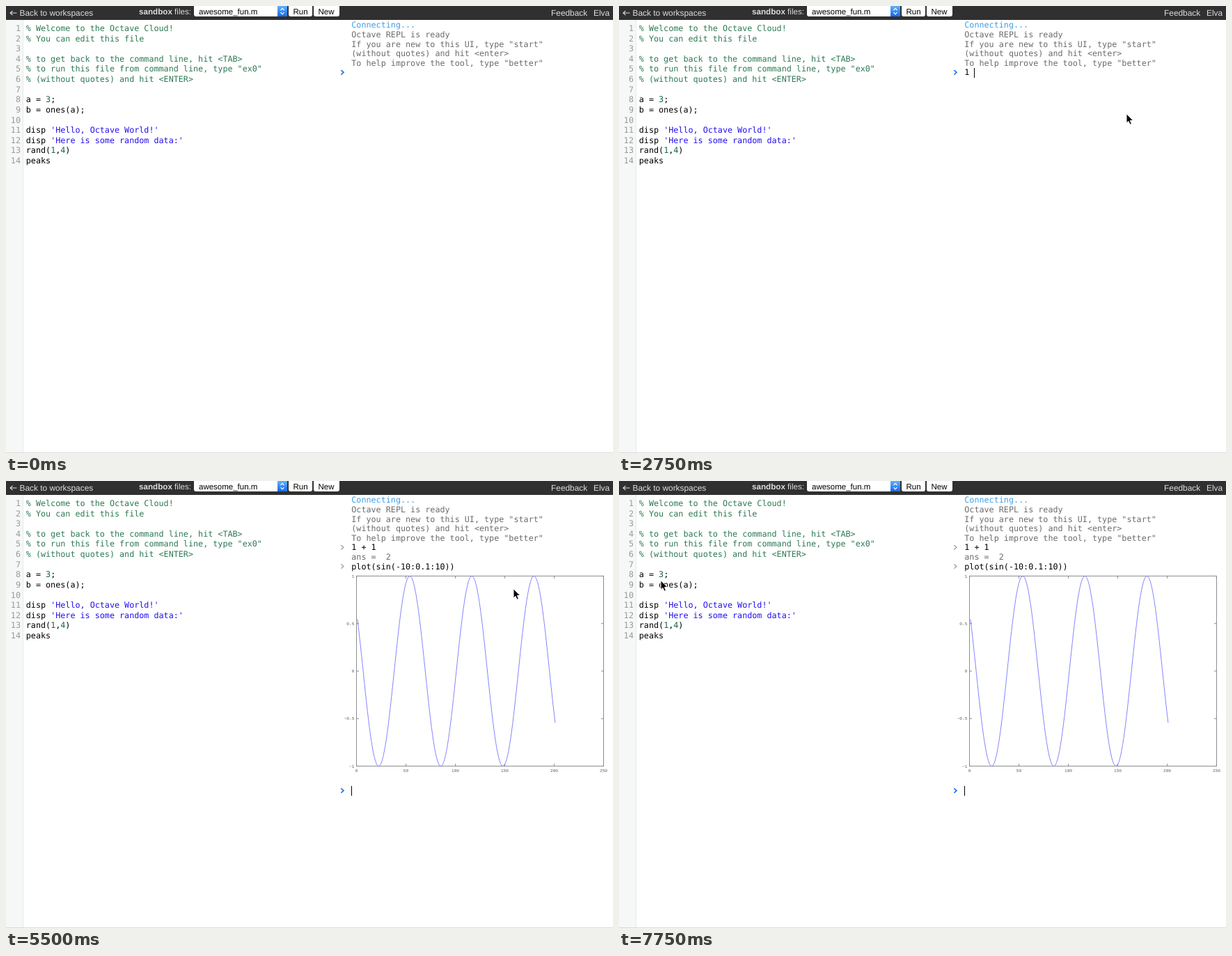
Recreate the animation shown at these times as an HTML page. Size 872 px wide and 642 px high, loop 8000 ms.

```html
<!DOCTYPE html>
<html lang="en">
<head>
<meta charset="utf-8">
<title>Octave workspace</title>
<style>
html, body { margin: 0; width: 100%; height: 100%; overflow: hidden; background: #fff; }
svg { display: block; width: 872px; height: 642px; }
text { white-space: pre; text-rendering: geometricPrecision; }
.mono { font: 11.74px "DejaVu Sans Mono", monospace; }
.ui { font: 11.9px "Liberation Sans", sans-serif; fill: #ddd; }
.ctl { font: 11.5px "Liberation Sans", sans-serif; fill: #000; }
.tick { font: 6.1px "Liberation Mono", monospace; fill: #606060; }
.num { fill: #999; text-anchor: end; }
.comment { fill: #2c7a52; }
.string { fill: #2410ee; }
.number { fill: #116644; }
.reply { fill: #6c6c6c; }
.status { fill: #3d9fe8; }
.prompt { fill: none; stroke: #a0a0a0; stroke-width: 1.3; }
.prompt.live { stroke: #2a78e4; stroke-width: 1.7; }
</style>
</head>
<body>
<svg id="stage" viewBox="0 0 872 642">
  <defs>
    <linearGradient id="blue" x2="0" y2="1">
      <stop stop-color="#62b0fa"/><stop offset="1" stop-color="#1769ea"/>
    </linearGradient>
  </defs>
  <rect width="872" height="642" fill="#fff"/>
  <rect y="20" width="24" height="622" fill="#f6f8f7"/>
  <path d="M24.5 20V642" stroke="#e2e4e3" stroke-width=".8"/>
  <rect y="641.5" width="872" height=".5" fill="#bbb"/>

  <rect width="872" height="20" fill="#303030"/>
  <path d="M15.5 10H6M9.5 6.8L6 10L9.5 13.2" fill="none" stroke="#ddd" stroke-width="1.1"/>
  <text class="ui" x="19.5" y="13.6">Back to workspaces</text>
  <text class="ui" x="191" y="12" style="font-size:11.65px"><tspan font-weight="bold">sandbox</tspan> files:</text>
  <text class="ui" x="783" y="13.6">Feedback</text>
  <text class="ui" x="844" y="13.6">Elva</text>

  <path d="M270 0H404V12a3 3 0 0 1-3 3H273a3 3 0 0 1-3-3Z" fill="#fff"/>
  <path d="M390 0H404V12a3 3 0 0 1-3 3H390Z" fill="url(#blue)"/>
  <path d="M394.5 6L397 3.3L399.5 6M394.5 9.2L397 11.9L399.5 9.2" fill="none" stroke="#fff" stroke-width="1.2"/>
  <path d="M406 0H440V12a3 3 0 0 1-3 3H409a3 3 0 0 1-3-3ZM442 0H479V12a3 3 0 0 1-3 3H445a3 3 0 0 1-3-3Z" fill="#fff"/>
  <text class="ctl" x="277" y="11.6">awesome_fun.m</text>
  <text class="ctl" x="423" y="11.6" text-anchor="middle">Run</text>
  <text class="ctl" x="460" y="11.6" text-anchor="middle">New</text>

  <g id="editor" class="mono"></g>
  <g id="repl" class="mono"></g>
  <g id="plot"></g>
  <path id="live" class="prompt live"/>
  <text id="input" class="mono" x="496.3"></text>
  <rect id="caret" width="1" height="14"/>
  <path id="mouse" d="M1 .8V14.2L4 11.5L6.1 16.3L8.4 15.3L6.4 10.6H10.8Z" stroke="#fff" stroke-width="1" stroke-linejoin="round"/>
</svg>
<script>
const NS = 'http://www.w3.org/2000/svg';
const $ = id => document.getElementById(id);
const CHAR = 7.07, LEFT = 496.35, ROW = 13.65;

function add(parent, tag, attrs, text = '') {
  const el = document.createElementNS(NS, tag);
  for (const k in attrs) el.setAttribute(k, attrs[k]);
  el.textContent = text;
  return parent.appendChild(el);
}

// Editor: each line is a list of [text, class] runs
const comment = s => [[s, 'comment']];
const code = s => [[s, '']];
const lines = [
  comment('% Welcome to the Octave Cloud!'),
  comment('% You can edit this file'),
  [],
  comment('% to get back to the command line, hit <TAB>'),
  comment('% to run this file from command line, type "ex0"'),
  comment('% (without quotes) and hit <ENTER>'),
  [],
  [['a = ', ''], ['3', 'number'], [';', '']],
  code('b = ones(a);'),
  [],
  [['disp ', ''], ["'Hello, Octave World!'", 'string']],
  [['disp ', ''], ["'Here is some random data:'", 'string']],
  [['rand(', ''], ['1', 'number'], [',', ''], ['4', 'number'], [')', '']],
  code('peaks')
];
lines.forEach((runs, i) => {
  const y = 36 + i * 14.615;
  add($('editor'), 'text', { x: 21, y, class: 'num' }, i + 1);
  const line = add($('editor'), 'text', { x: 28.8, y });
  runs.forEach(([s, cls]) => add(line, 'tspan', { class: cls }, s));
});

// Console
const rowMid = i => 27.1 + i * ROW;
const chevron = y => `M481.3 ${y - 3.2}L485 ${y}L481.3 ${y + 3.2}`;
const printRow = (parent, i, s, cls) =>
  add(parent, 'text', { x: 496.3, y: rowMid(i) + 4.1, class: cls }, s);

['Connecting...', 'Octave REPL is ready', 'If you are new to this UI, type "start"',
  '(without quotes) and hit <enter>', 'To help improve the tool, type "better"']
  .forEach((s, i) => printRow($('repl'), i, s, i ? 'reply' : 'status'));

const log = [['1 + 1', true], ['ans =  2', false], ['plot(sin(-10:0.1:10))', true]]
  .map(([s, typed], i) => {
    const g = add($('repl'), 'g', {});
    printRow(g, i + 5, s, typed ? '' : 'reply');
    if (typed) add(g, 'path', { d: chevron(rowMid(i + 5)), class: 'prompt' });
    return g;
  });
log.push($('plot'));

// Plot of sin(-10:0.1:10)
function drawPlot(g) {
  const x0 = 503.5, x1 = 858.5, y0 = 136.5, y1 = 409.5, mid = 273, amp = 136.5;
  let marks = `M${x0} ${y0}H${x1}V${y1}H${x0}Z`;
  for (let i = 0; i <= 5; i++) {
    const x = x0 + 71 * i;
    marks += `M${x} ${y0}v3.5M${x} ${y1}v-3.5`;
    add(g, 'text', { x, y: 417.6, class: 'tick', 'text-anchor': 'middle' }, 50 * i);
  }
  for (let v = -1; v <= 1; v += 0.5) {
    const y = mid - v * amp;
    marks += `M${x0} ${y}h3.5M${x1} ${y}h-3.5`;
    add(g, 'text', { x: 500.3, y: y + 2.1, class: 'tick', 'text-anchor': 'end' },
      String(v).replace('-', '−'));
  }
  add(g, 'path', { d: marks, fill: 'none', stroke: '#808080', 'stroke-width': 0.9 });
  const pts = Array.from({ length: 201 }, (_, i) =>
    `${(x0 + (i + 1) * 1.42).toFixed(2)},${(mid - amp * Math.sin(i / 10 - 10)).toFixed(2)}`);
  add(g, 'polyline', { points: pts.join(' '), fill: 'none', stroke: '#7676ff', 'stroke-width': 0.9 });
}
drawPlot($('plot'));

// Timeline: every step changes part of the state
const steps = [
  [0, { mouse: null, caret: '', typed: '', log: 0 }],
  [500, { mouse: [754, 52] }],
  [750, { mouse: [734, 99] }],
  [1000, { caret: 'editor' }],
  [1500, { mouse: [728, 154] }],
  [1750, { caret: 'repl' }],
  [2250, { caret: '' }],
  [2500, { caret: 'repl', typed: '1' }],
  [2750, { typed: '1 ' }],
  [3000, { typed: '1 +' }],
  [3250, { typed: '1 + 1' }],
  [3500, { typed: '', log: 1 }],
  [3750, { log: 2 }],
  [4000, { caret: '' }],
  [4250, { caret: 'repl', typed: 'plot(sin(-10:0.1:10))' }],
  [4750, { caret: '' }],
  [5000, { caret: 'repl', typed: '', log: 3 }],
  [5500, { log: 4 }],
  [6000, { caret: '' }],
  [6500, { caret: 'repl', mouse: [620, 153] }],
  [6750, { mouse: [258, 187] }],
  [7000, { caret: '', mouse: [136, 183] }],
  [7250, { mouse: [106, 159] }],
  [7500, { caret: 'repl', mouse: [71, 147] }],
  [7750, { mouse: [59, 142] }]
];
const stateAt = t => Object.assign({}, ...steps.filter(s => s[0] <= t).map(s => s[1]));
const show = (el, on) => el.setAttribute('visibility', on ? 'visible' : 'hidden');

function render(t) {
  const s = stateAt(t);
  const y = s.log === 4 ? 444.7 : rowMid(s.log + 5);
  log.forEach((g, i) => show(g, i < s.log));
  $('live').setAttribute('d', chevron(y));
  $('input').setAttribute('y', y + 4.1);
  $('input').textContent = s.typed;

  const inEditor = s.caret === 'editor';
  show($('caret'), s.caret);
  $('caret').setAttribute('x', inEditor ? 29 : Math.round(LEFT + s.typed.length * CHAR));
  $('caret').setAttribute('y', inEditor ? 25 : Math.round(y - 6.7));

  show($('mouse'), s.mouse);
  if (s.mouse) $('mouse').setAttribute('transform', `translate(${s.mouse})`);
}

function tick() {
  render(performance.now() % 8000);
  requestAnimationFrame(tick);
}
tick();
</script>
</body>
</html>
```
